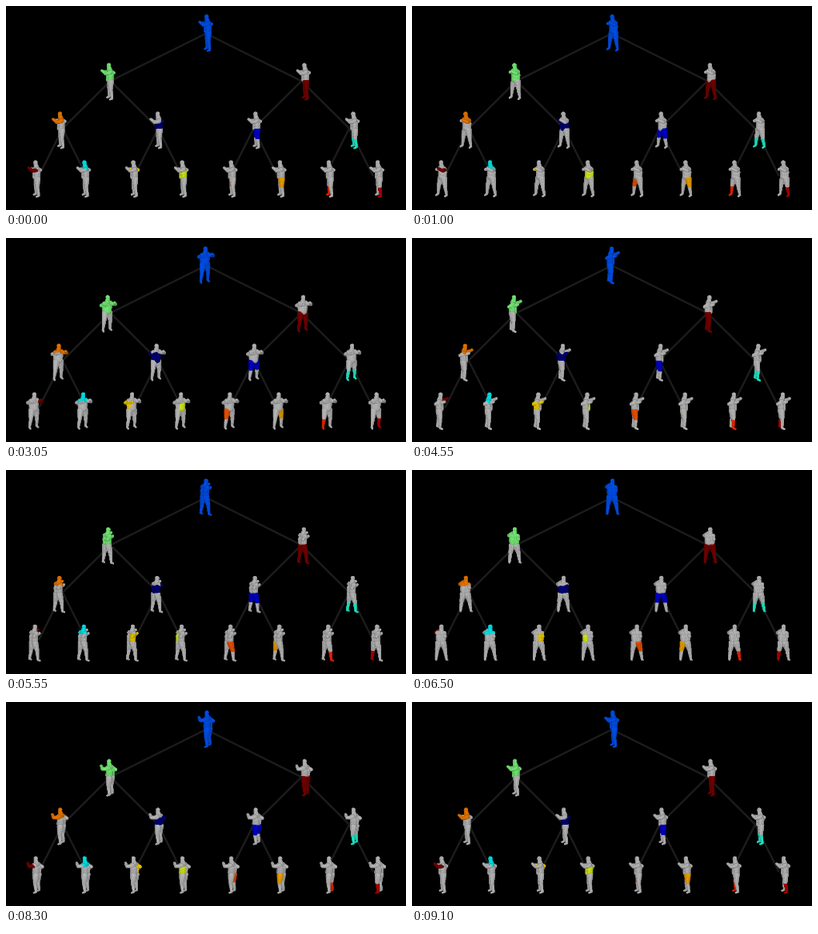
Write an HTML page with a canvas that moves like this. It is 500 by 256 pixels and loops after 9150 ms.

```html
<!DOCTYPE html>
<html lang="en">
<head>
<meta charset="utf-8">
<title>Body part tree</title>
<style>
html, body { margin: 0; width: 100%; height: 100%; overflow: hidden; background: #000; }
canvas { display: block; }
</style>
</head>
<body>
<canvas id="stage" width="500" height="256"></canvas>
<script>
const ctx = document.getElementById('stage').getContext('2d');
const LOOP = 9150, STEP = 50, TILT = 0.2;
const LEAF_GAP = 61.1, ROOT = { x: 249.9, y: 34.5 }, LEVEL_GAP = 61;
const LINK_SCALE = 0.977; // links lie in a plane behind the figures
const SCALE = 2, WIDTH = 64, HEIGHT = 124, AXIS = 16, TOP = 6;

// Parts are numbered in leaf order, so each node owns a run of them.
const LEFT_ARM = 0, HEAD = 1, RIGHT_ARM = 2, BELLY = 3, THIGHS = 4, CALVES = 6;

// Rainbow position of each node's colour, level by level.
const HUES = [[0.21], [0.5, 1], [0.75, 0, 0.09, 0.41],
  [1, 0.37, 0.66, 0.6, 0.79, 0.705, 0.835, 0.94]];
const GREY = [184, 184, 184];

const clamp = v => Math.min(1, Math.max(0, v));
const rainbow = v => [3, 2, 1].map(peak => 236 * clamp(1.5 - Math.abs(4 * v - peak)));
const colours = HUES.map(row => row.map(rainbow));

const spheres = [];

// Fills a tapered chain through points [x, y, z, radius]; -x is forward, +z the left side.
function chain(part, ...points) {
  for (let i = 1; i < points.length; i++) {
    for (let t = 0; t <= 1; t += 1 / 14) {
      const [x, y, z, r] = points[i].map((v, k) => points[i - 1][k] * (1 - t) + v * t);
      spheres.push({ part, x, y, z, r });
    }
  }
}

function addLeg(index) {
  const side = index ? 1 : -1;
  const knee = [2 + side, 33.4, 5 * side - 0.6];
  const ankle = [3 + 1.8 * side, 44.6, 6.2 * side - 1.1];
  chain(THIGHS + index, [2.6, 23.8, 2.9 * side - 0.4, 4.3], [...knee, 2.6]);
  chain(CALVES + index, [knee[0], 34.6, knee[2], 2.5], [...ankle, 1.6],
    [ankle[0] - 2.8, 46, ankle[2] + 0.4 * side, 1.3]);
}

chain(HEAD, [0.6, 3.2, -0.6, 2.8], [0.5, 5, -0.6, 2.5], [1.8, 10, -0.5, 3.4]);
chain(HEAD, [2, 11.4, -4.4, 3.2], [2, 11.4, 3.8, 3.2]);
chain(LEFT_ARM, [1.6, 12, 5, 2.6], [-3.5, 12.2, 8, 2.3], [-8, 9.2, 4.2, 1.8]);
chain(RIGHT_ARM, [2.8, 12.2, -5, 2.6], [6.5, 14.2, -6.6, 2.3], [-4.4, 12, -3.4, 1.9]);
chain(RIGHT_ARM, [2.8, 15.5, -3, 4.2], [2.8, 19.5, -2.8, 4]);
chain(BELLY, [1.4, 16.5, 0.2, 4.5], [1.2, 21, -0.2, 4.7]);
chain(BELLY, [2.6, 16, 1.8, 4.4], [2.6, 19.5, 1.6, 4.3]);
addLeg(0);
addLeg(1);

const depth = new Float32Array(WIDTH * HEIGHT);
const light = new Float32Array(WIDTH * HEIGHT);
const parts = new Int8Array(WIDTH * HEIGHT);
const sprite = document.createElement('canvas');
sprite.width = WIDTH;
sprite.height = HEIGHT;
const spriteCtx = sprite.getContext('2d', { willReadFrequently: true });
const image = spriteCtx.createImageData(WIDTH, HEIGHT);

// Renders the pose once per frame: nearest part and its shade at each pixel.
function renderBody(angle) {
  const cos = Math.cos(angle), sin = Math.sin(angle);
  depth.fill(-1e3);
  parts.fill(-1);
  for (const s of spheres) {
    const z = s.z * cos - s.x * sin;
    const cx = (s.x * cos + s.z * sin + AXIS) * SCALE;
    const cy = (s.y * 0.98 + z * TILT + TOP) * SCALE;
    const r = s.r * SCALE;
    for (let py = Math.ceil(cy - r); py <= cy + r; py++) {
      for (let px = Math.ceil(cx - r); px <= cx + r; px++) {
        const nx = (px - cx) / r, ny = (py - cy) / r, d = 1 - nx * nx - ny * ny;
        if (d < 0) continue;
        const nz = Math.sqrt(d), surface = z - s.y * TILT + nz * s.r, at = py * WIDTH + px;
        if (surface <= depth[at]) continue;
        const mx = s.x + s.r * (nx * cos - nz * sin);
        const mz = s.z + s.r * (nx * sin + nz * cos);
        const folds = Math.sin(mx * 1.7 + py * 0.45) * Math.sin(mz * 1.9 - py * 0.3);
        depth[at] = surface;
        parts[at] = s.part;
        light[at] = 0.58 + 0.38 * nz - 0.08 * ny + 0.07 * folds;
      }
    }
  }
}

function nodeAt(level, index, scale = 1) {
  const offset = (index + 0.5) * (8 >> level) - 4;
  return [ROOT.x + offset * LEAF_GAP * scale, ROOT.y + level * LEVEL_GAP * scale];
}

function drawFigure(level, index) {
  const share = 8 >> level;
  for (let i = 0; i < parts.length; i++) {
    const visible = parts[i] >= 0;
    image.data[i * 4 + 3] = visible ? 255 : 0;
    if (!visible) continue;
    const lit = Math.floor(parts[i] / share) === index;
    const colour = lit ? colours[level][index] : GREY;
    for (let c = 0; c < 3; c++) image.data[i * 4 + c] = colour[c] * light[i];
  }
  spriteCtx.putImageData(image, 0, 0);
  const [x, y] = nodeAt(level, index);
  ctx.drawImage(sprite, x - AXIS, y - 24.5 - TOP, WIDTH / SCALE, HEIGHT / SCALE);
}

function drawLink(level, index) {
  if (!level) return;
  ctx.beginPath();
  ctx.moveTo(...nodeAt(level, index, LINK_SCALE));
  ctx.lineTo(...nodeAt(level - 1, index >> 1, LINK_SCALE));
  ctx.stroke();
}

function eachNode(visit) {
  HUES.forEach((row, level) => row.forEach((_, index) => visit(level, index)));
}

function frame() {
  const step = Math.floor(performance.now() % LOOP / STEP);
  ctx.fillStyle = '#000';
  ctx.fillRect(0, 0, 500, 256);
  ctx.strokeStyle = '#1c1c1c';
  ctx.lineWidth = 2.5;
  eachNode(drawLink);
  renderBody(2 * Math.PI * step * STEP / LOOP);
  eachNode(drawFigure);
  requestAnimationFrame(frame);
}
frame();
</script>
</body>
</html>
```
